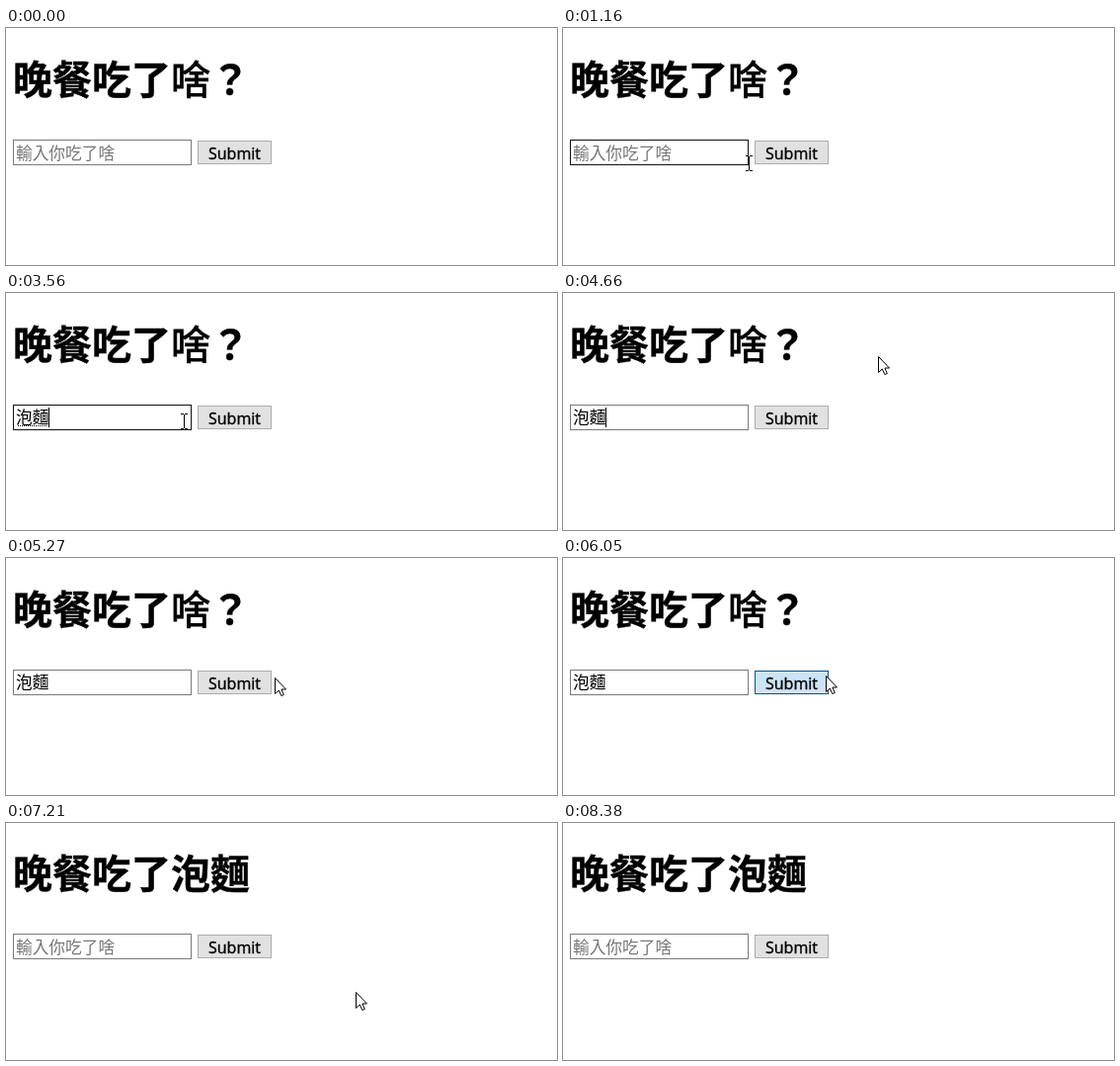
These frames come from a looping animation (558x240 px, 9.31 s). An HTML page:

```html
<!DOCTYPE html>
<html lang="zh-Hant">
<head>
<meta charset="utf-8">
<title>晚餐吃了啥？</title>
<style>
  html, body { margin: 0; width: 100%; height: 100%; overflow: hidden; background: #fff; }
  svg { display: block; }
  text { font: 16.7px "Noto Sans CJK TC", "Noto Sans CJK SC", "Noto Sans CJK JP", "Noto Sans CJK", sans-serif; }
  .title { font-size: 40px; font-weight: 700; stroke: #000; stroke-width: .4px; }
  .thin { font-weight: 400; stroke-width: 1px; }
  #hint { fill: #757575; }
  #label { font: 16px "Open Sans", "Noto Sans", sans-serif; stroke: #000; stroke-width: .35px; }
  #field { fill: #fff; stroke: #7a7a7a; }
  #field.hover { stroke: #111; }
  #button { fill: #e1e1e1; stroke: #adadad; }
  #button.hover { fill: #e5f1fb; stroke: #0078d7; }
  #button.pressed { fill: #cce4f7; stroke: #005499; }
  #underline { stroke: #000; stroke-dasharray: 1 1; }
</style>
</head>
<body>
<svg width="558" height="240" viewBox="0 0 558 240">
  <g id="page">
    <text class="title" x="7" y="67">晚餐吃了<tspan id="question"><tspan class="thin">啥</tspan>？</tspan></text>
    <text class="title" id="answer" x="167" y="67">泡麵</text>
    <rect id="field" x="7.5" y="113.5" width="180" height="25"/>
    <text id="hint" x="10" y="133">輸入你吃了啥</text>
    <text id="value" x="10" y="132"></text>
    <path id="underline"/>
    <rect id="caret" y="116" width="1" height="20"/>
    <rect id="button" x="194.5" y="114.5" width="74" height="23"/>
    <text id="label" x="205" y="133">Submit</text>
  </g>
  <path id="arrow" fill="#fff" stroke="#000" d="M.5 .5V16.5L4.3 13 6.8 18.5 9.3 17.5 6.9 12H11.5Z"/>
  <path id="beam" fill="none" stroke="#000" d="M-3 -7.5H0M1 -7.5H4M.5 -7V7M-3 7.5H0M1 7.5H4"/>
</svg>
<script>
  const LOOP = 9310, STEP = 77.6, BLINK = 530;
  const FOCUS = 1780, COMMIT = 3930, PRESS = 6050, SUBMIT = 6200;
  const $ = id => document.getElementById(id);
  const show = (id, on) => $(id).setAttribute('visibility', on ? 'visible' : 'hidden');

  const syllables = [
    { start: 2630, gap: 150, keys: 'ㄆㄠ', done: 2940, word: '泡' },
    { start: 3170, gap: 80, keys: 'ㄇㄧㄢ', done: 3560, word: '麵' }
  ];
  const edits = [FOCUS, ...syllables.flatMap(s => [s.start, s.done])];

  // Each journey sets off from where the previous one ended
  const journeys = [
    { start: 222, end: 460, to: [224, 176] },
    { start: 690, end: 1470, to: [188, 137], power: 5 },
    { start: 1692, end: 1930, to: [180, 130] },
    { start: 4352, end: 5350, to: [270, 122], via: [410, 3], power: 2 },
    { start: 5362, end: 5670, to: [266, 119] },
    { start: 6122, end: 6280, to: [263, 121] },
    { start: 6982, end: 7210, to: [354, 171] },
    { start: 8082, end: 8380, to: [570, 260] }
  ];

  // Advances in whole steps, slowing towards the end
  function progress({ start, end, power = 1 }, t) {
    const steps = Math.round((end - start) / STEP);
    const done = Math.floor((t - start) / (end - start) * steps + .05) / steps;
    return 1 - (1 - Math.min(1, Math.max(0, done))) ** power;
  }

  function pointerAt(t) {
    let at = [510, 250];
    for (const journey of journeys) {
      if (t < journey.start) break;
      const { to, via } = journey, p = progress(journey, t);
      at = at.map((from, axis) => {
        const bend = via ? via[axis] : (from + to[axis]) / 2;
        return Math.round((1 - p) ** 2 * from + 2 * p * (1 - p) * bend + p * p * to[axis]);
      });
    }
    return at;
  }

  function typedAt(t) {
    if (t >= SUBMIT) return '';
    return syllables.filter(s => t >= s.start).map(s =>
      t >= s.done ? s.word : s.keys.slice(0, 1 + Math.floor((t - s.start) / s.gap))
    ).join('');
  }

  function caretAt(t) {
    if (t < FOCUS || t >= SUBMIT) return false;
    const idle = t >= COMMIT ? t - COMMIT + BLINK : t - Math.max(...edits.filter(e => e <= t));
    return idle % (2 * BLINK) < BLINK;
  }

  function draw(t) {
    const [x, y] = pointerAt(t);
    const submitted = t >= SUBMIT;
    const inRow = y >= 113 && y <= 138;
    const overField = inRow && x >= 7 && x <= 189;
    const overButton = inRow && x >= 194 && x < 269;

    $('page').setAttribute('transform', `translate(0 ${submitted ? -1 : 0})`);
    show('question', !submitted);
    show('answer', submitted);

    const value = typedAt(t);
    const caretX = Math.round(10 + 16.7 * value.length);
    $('value').textContent = value;
    show('hint', !value);
    show('caret', caretAt(t));
    $('caret').setAttribute('x', caretX);
    show('underline', value && t < COMMIT);
    $('underline').setAttribute('d', `M12 134.5H${caretX - 1}`);

    const pressed = t >= PRESS && !submitted;
    $('field').setAttribute('class', overField ? 'hover' : '');
    $('button').setAttribute('class', overButton ? (pressed ? 'pressed' : 'hover') : '');

    for (const id of ['arrow', 'beam']) $(id).setAttribute('transform', `translate(${x} ${y})`);
    show('arrow', t >= 300 && !overField);
    show('beam', overField);
  }

  const began = performance.now();
  function tick() {
    draw((performance.now() - began) % LOOP);
    requestAnimationFrame(tick);
  }
  tick();
</script>
</body>
</html>
```
